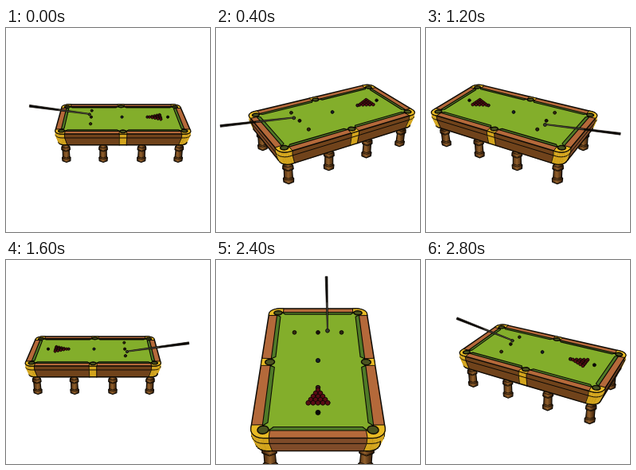
An HTML page with a canvas for the animation above (3200 ms loop, 256 by 256 pixels).

```html
<!DOCTYPE html>
<html lang="en">
<head>
<meta charset="utf-8">
<title>Turning snooker table</title>
<style>
  html, body { margin: 0; width: 100%; height: 100%; overflow: hidden; background: #fff; }
  canvas { display: block; width: 100vw; height: 100vh; }
</style>
</head>
<body>
<canvas id="stage"></canvas>
<script>
const SIZE = 256, STEP = 400;
const canvas = document.getElementById('stage');
const ratio = window.devicePixelRatio || 1;
canvas.width = canvas.height = SIZE * ratio;
const ctx = canvas.getContext('2d');
ctx.scale(ratio, ratio);
ctx.lineJoin = ctx.lineCap = 'round';

const INK = '#0d0a05', GOLD = '#e8ba24', GOLD_SIDE = '#d3a41c';
const RAIL = '#b4693a', APRON = '#70431b', APRON_END = '#7f4b29';
const CLOTH = '#83ae2b', CUSHION = '#4f7a27';

// Camera stops: turn in degrees, sine of elevation, zoom, perspective, offset from the optical axis.
const side = { rise: .45, zoom: 72.7, depth: .153, y: -15 };
const low = { rise: .51, zoom: 86.5, depth: .18, y: -21 };
const high = { rise: .5, zoom: 86.5, depth: .18, y: -11 };
const views = [
  { ...side, turn: 0, x: 17.5 },
  { ...low, turn: -29, x: 18 },
  { turn: -90, rise: .65, zoom: 103.5, depth: .237, x: 0, y: -34.5 },
  { ...low, turn: -151, x: -18 },
  { ...side, turn: -180, x: -17.5 },
  { ...high, turn: -208, x: -18 },
  { turn: -270, rise: .61, zoom: 118.4, depth: .203, x: 0, y: 0 },
  { ...high, turn: -332, x: 18 }
];

// Table space: u along the length (-1..1), v across (-.5...5), z upwards.
const LONG = 1.09, WIDE = .6, ROUND = .12;
const FLOOR = -.58, APRON_Z = -.21;
const signs = [[1, 1], [-1, 1], [-1, -1], [1, -1]];

function cornerArc(i) {
  const [su, sv] = signs[i], points = [];
  for (let n = 0; n <= 6; n++) {
    const a = (i + n / 6) * Math.PI / 2;
    points.push([su * (LONG - ROUND) + ROUND * Math.cos(a), sv * (WIDE - ROUND) + ROUND * Math.sin(a)]);
  }
  return points;
}

const outline = signs.flatMap((_, i) => {
  const s = i < 2 ? 1 : -1;
  const edge = i % 2
    ? [.43, -.43].map(v => [-LONG * s, v * s])
    : [.93, .06, -.06, -.93].map(u => [u * s, WIDE * s]);
  return [...cornerArc(i), ...edge];
});

const legProfile = [[-.18, .052], [-.29, .05], [-.31, .066], [-.36, .07], [-.38, .054],
  [-.5, .056], [-.52, .07], [FLOOR, .066]];

const balls = [
  [-.53, .27, '#2a2410'], [-.53, 0, '#1c120a'], [-.53, -.27, '#332a0c'], [0, 0, '#14202a'],
  [.438, 0, '#38141a'], [.79, 0, '#080808'], [-.565, .11, '#3a3d30']
];
for (let row = 0; row < 5; row++)
  for (let n = 0; n <= row; n++)
    balls.push([.475 + row * .046, (n - row / 2) * .046, '#5a0c14']);

function makeCamera(view) {
  const turn = view.turn * Math.PI / 180;
  const cos = Math.cos(turn), sin = Math.sin(turn);
  const flat = Math.sqrt(1 - view.rise ** 2);
  const back = (u, v) => -u * sin + v * cos;
  function project([u, v, z = 0]) {
    const b = back(u, v);
    const q = 1 / (1 + view.depth * (b * flat - z * view.rise));
    return {
      x: 128 + (view.x + view.zoom * (u * cos + v * sin)) * q,
      y: 128 + (view.y - view.zoom * (b * view.rise + z * flat)) * q,
      scale: view.zoom * q
    };
  }
  return { project, back };
}

function trace(points, closed = true) {
  ctx.beginPath();
  points.forEach(p => ctx.lineTo(p.x, p.y));
  if (closed) ctx.closePath();
}

function paint(points, fill, width = 1, ink = INK) {
  trace(points);
  ctx.fillStyle = fill;
  ctx.fill();
  if (width) line(points, width, ink, true);
}

function line(points, width, ink = INK, closed = false) {
  trace(points, closed);
  ctx.lineWidth = width;
  ctx.strokeStyle = ink;
  ctx.stroke();
}

function drawLegs({ project, back }) {
  const legs = [-.94, -.32, .32, .94].flatMap(u => [[u, .46], [u, -.46]]);
  legs.sort((a, b) => back(...b) - back(...a));
  for (const [u, v] of legs) {
    const rings = legProfile.map(([z, r]) => {
      const p = project([u, v, z]);
      return { ...p, r: r * p.scale };
    });
    const left = rings.map(p => ({ x: p.x - p.r, y: p.y }));
    const right = rings.map(p => ({ x: p.x + p.r, y: p.y }));
    const foot = rings[rings.length - 1];
    const shade = ctx.createLinearGradient(foot.x - foot.r, 0, foot.x + foot.r, 0);
    shade.addColorStop(0, '#4a2a0e');
    shade.addColorStop(.45, '#92602c');
    shade.addColorStop(1, '#3c210a');
    paint([...left, { x: foot.x, y: foot.y + foot.r * .4 }, ...right.reverse()], shade, 1.2);
    rings.slice(2, -1).forEach(p =>
      line([{ x: p.x - p.r, y: p.y }, { x: p.x, y: p.y + p.r * .35 }, { x: p.x + p.r, y: p.y }], .8));
  }
}

function wallColor(u, v) {
  const atCorner = Math.abs(u) > .93 && Math.abs(v) > .43;
  const atMiddle = Math.abs(u) < .06;
  if (atCorner || atMiddle) return GOLD_SIDE;
  return Math.abs(u) > 1 ? APRON_END : APRON;
}

function drawApron({ project }) {
  const level = (p, z, inset = 1) => project([p[0] * inset, p[1] * inset, z]);
  outline.forEach((a, i) => {
    const b = outline[(i + 1) % outline.length];
    const top = [level(a, 0), level(b, 0)];
    if (top[1].x <= top[0].x) return;
    const rim = [level(a, -.07), level(b, -.07)];
    const base = [level(a, APRON_Z, .965), level(b, APRON_Z, .965)];
    const color = wallColor((a[0] + b[0]) / 2, (a[1] + b[1]) / 2);
    paint([...top, rim[1], base[1], base[0], rim[0]], color, .5, color);
    line(rim, 1);
    line(base, 1.4);
    const before = outline[(i + outline.length - 1) % outline.length];
    if (wallColor((a[0] + before[0]) / 2, (a[1] + before[1]) / 2) !== color)
      line([top[0], rim[0], base[0]], .9);
  });
}

function drawTop({ project }) {
  const area = points => points.map(project);
  paint(area(outline), RAIL, 1.5);
  signs.forEach(([su, sv], i) => {
    const ends = [[LONG * su, .43 * sv], [.93 * su, WIDE * sv]];
    const inner = [[.93 * su, .48 * sv], [.98 * su, .43 * sv]];
    if (i % 2) { ends.reverse(); inner.reverse(); }
    paint(area([ends[0], ...cornerArc(i), ends[1], ...inner]), GOLD, 1);
  });
  for (const s of [1, -1])
    paint(area([[-.06, .49 * s], [.06, .49 * s], [.06, WIDE * s], [-.06, WIDE * s]]), GOLD, .9);

  paint(area([[-.99, -.49], [.99, -.49], [.99, .49], [-.99, .49]]), CLOTH, .8);
  for (const [su, sv] of signs)
    paint(area([[.06 * su, .5 * sv], [.94 * su, .5 * sv], [.9 * su, .455 * sv], [.09 * su, .455 * sv]]), CUSHION, 1.1);
  for (const s of [1, -1])
    paint(area([[s, -.44], [s, .44], [.955 * s, .4], [.955 * s, -.4]]), CUSHION, 1.1);

  const pockets = [...signs.map(([su, sv]) => [.99 * su, .49 * sv]), [0, .51], [0, -.51]];
  for (const [u, v] of pockets) {
    const rim = Array.from({ length: 16 }, (_, n) => {
      const a = n * Math.PI / 8;
      return [u + .05 * Math.cos(a), v + .05 * Math.sin(a)];
    });
    paint(area(rim), '#4b5420', 1.4);
  }
}

function drawBalls({ project, back }) {
  const sorted = [...balls].sort((a, b) => back(b[0], b[1]) - back(a[0], a[1]));
  for (const [u, v, color] of sorted) {
    const p = project([u, v, .02]);
    ctx.beginPath();
    ctx.arc(p.x, p.y, p.scale * .022, 0, 7);
    ctx.fillStyle = color;
    ctx.fill();
    ctx.lineWidth = .9;
    ctx.strokeStyle = INK;
    ctx.stroke();
  }
}

function drawCue({ project }) {
  const tip = project([-.59, .11, .03]), butt = project([-1.6, .11, .18]);
  const length = Math.hypot(butt.x - tip.x, butt.y - tip.y);
  const nx = (tip.y - butt.y) / length, ny = (butt.x - tip.x) / length;
  const at = (p, w) => ({ x: p.x + nx * w, y: p.y + ny * w });
  paint([at(tip, .6), at(butt, 1.4), at(butt, -1.4), at(tip, -.6)], INK, .7);
  const half = { x: (tip.x + butt.x) / 2, y: (tip.y + butt.y) / 2 };
  line([tip, half], .6, '#77736a');
}

function draw(index) {
  const camera = makeCamera(views[index]);
  ctx.fillStyle = '#fff';
  ctx.fillRect(0, 0, SIZE, SIZE);
  [drawLegs, drawApron, drawTop, drawBalls, drawCue].forEach(part => part(camera));
}

let shown = -1;
function tick() {
  const index = Math.floor(performance.now() / STEP) % views.length;
  if (index !== shown) draw(shown = index);
  requestAnimationFrame(tick);
}
tick();
</script>
</body>
</html>
```
